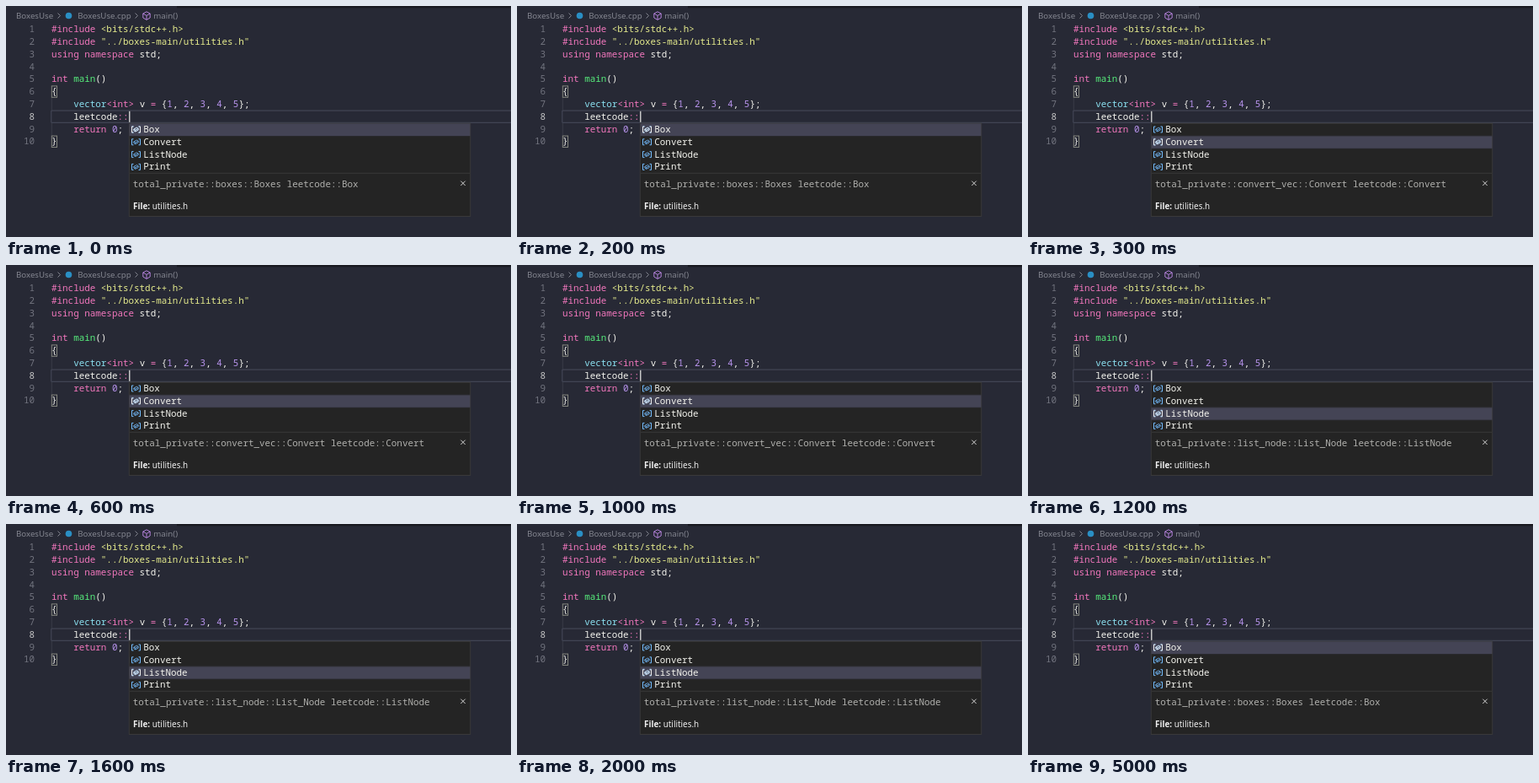
An HTML page for the animation above (5500 ms loop, 600 by 274 pixels).

```html
<!DOCTYPE html>
<html lang="en">
<head>
<meta charset="utf-8">
<title>Code completion</title>
<style>
html, body { margin: 0; width: 100%; height: 100%; overflow: hidden; background: #272935; }
svg { display: block; width: 600px; height: 274px; }
text { white-space: pre; }
.code { font: 10.9px "Noto Sans Mono", "DejaVu Sans Mono", monospace; fill: #f4f4ee; }
.ui { font: 9.7px "Noto Sans", "Open Sans", sans-serif; fill: #858791; }
.file { font-size: 9.9px; fill: #f0f0f0; }
.file tspan { font-weight: 700; }
.num { fill: #72747f; text-anchor: end; }
.num .now { fill: #c8c8c8; }
.k { fill: #f277bd; }
.s { fill: #e6ec8d; }
.t { fill: #8be0f0; }
.f { fill: #57ee7c; }
.n { fill: #b994ee; }
.line { fill: none; stroke-width: 1; }
.detail { fill: #b0b0ad; }
#items { color: #75beff; }
.mark { color: #f0f0f0; }

/* The selection rests on Box, Convert, ListNode, then returns to Box. */
.pick, .detail { animation: 5.5s step-end infinite; }
.pick { animation-name: pick; }
.box { animation-name: box; }
.convert { animation-name: convert; }
.list { animation-name: list; }
@keyframes pick {
  0%, 90.909% { transform: translateY(0); }
  5.4545% { transform: translateY(14.8px); }
  21.818% { transform: translateY(29.6px); }
}
@keyframes box {
  0%, 90.909% { visibility: visible; }
  5.4545% { visibility: hidden; }
}
@keyframes convert {
  0%, 21.818% { visibility: hidden; }
  5.4545% { visibility: visible; }
}
@keyframes list {
  0%, 90.909% { visibility: hidden; }
  21.818% { visibility: visible; }
}
</style>
</head>
<body>
<svg viewBox="0 0 600 274">
  <defs>
    <g id="symbol" class="line" stroke="currentColor">
      <path d="M-3 -3.5H-5V3.5H-3M3 -3.5H5V3.5H3"/>
      <path d="M-2.7 -.4L.8 -2.3L2.7 -1.1V.7L-.8 2.4L-2.7 1.3ZM-2.7 -.4L-.8 .7L2.7 -1.1M-.8 .7V2.4" stroke-width=".8"/>
    </g>
    <path id="chevron" class="line" stroke="#858791" d="M-1.5 -3L1.5 0L-1.5 3"/>
  </defs>

  <!-- Tab strip edge and breadcrumbs -->
  <rect x="203" width="397" height="2.4" fill="#191a21"/>
  <g class="ui">
    <text x="12" y="14.7">BoxesUse</text>
    <text x="85.3" y="14.7">BoxesUse.cpp</text>
    <text x="175.3" y="14.7">main()</text>
  </g>
  <use href="#chevron" x="63" y="11.5"/>
  <use href="#chevron" x="155" y="11.5"/>
  <circle cx="74.5" cy="11.5" r="3.8" fill="#2a8fc4"/>
  <path class="line" stroke="#b180d7" d="M167 6.8L171.2 9V14L167 16.4L162.8 14V9ZM162.8 9L167 11.4L171.2 9M167 11.4V16.4"/>

  <!-- Editor -->
  <path class="line" stroke="#484b5c" d="M600 124.1H53.8V138.3H600"/>
  <path class="line" stroke="#3b3d49" d="M54.3 109V124M54.3 139V154"/>
  <g class="line" stroke="#85877f">
    <rect x="54.3" y="94.9" width="6.2" height="13.4"/>
    <rect x="54.3" y="154.1" width="6.2" height="13.4"/>
  </g>
  <g class="code num" id="numbers"></g>
  <g class="code">
    <text x="54" y="31.2"><tspan class="k">#include</tspan> <tspan class="s">&lt;bits/stdc++.h&gt;</tspan></text>
    <text x="54" y="46"><tspan class="k">#include</tspan> <tspan class="s">"../boxes-main/utilities.h"</tspan></text>
    <text x="54" y="60.8"><tspan class="k">using namespace</tspan> std;</text>
    <text x="54" y="90.4"><tspan class="k">int</tspan> <tspan class="f">main</tspan>()</text>
    <text x="54" y="105.2">{</text>
    <text x="80.2" y="120"><tspan class="t">vector</tspan><tspan class="k">&lt;int&gt;</tspan> v <tspan class="k">=</tspan> {<tspan class="n">1</tspan>, <tspan class="n">2</tspan>, <tspan class="n">3</tspan>, <tspan class="n">4</tspan>, <tspan class="n">5</tspan>};</text>
    <text x="80.2" y="134.8">leetcode<tspan class="k">::</tspan></text>
    <text x="80.2" y="149.6"><tspan class="k">return</tspan> <tspan class="n">0</tspan>;</text>
    <text x="54" y="164.4">}</text>
  </g>
  <rect x="146.2" y="124.8" width="1.2" height="13" fill="#eeeeea"/>

  <!-- Suggestions -->
  <rect x="146.3" y="139.2" width="405.4" height="110.3" fill="#242424" stroke="#393939"/>
  <rect class="pick" x="146.5" y="139.4" width="405" height="14.8" fill="#444455"/>
  <g class="code" id="items"></g>
  <g class="pick mark"><use href="#symbol" x="154.5" y="146.5"/></g>
  <path class="line" stroke="#393939" d="M147 198.3H551"/>
  <g class="code">
    <text class="detail box" x="150.7" y="214.7">total_private::boxes::Boxes leetcode::Box</text>
    <text class="detail convert" x="150.7" y="214.7">total_private::convert_vec::Convert leetcode::Convert</text>
    <text class="detail list" x="150.7" y="214.7">total_private::list_node::List_Node leetcode::ListNode</text>
  </g>
  <path class="line" stroke="#d0d0d0" d="M540.3 207.6L545.7 213M545.7 207.6L540.3 213"/>
  <text class="ui file" x="151" y="241.4"><tspan>File:</tspan> utilities.h</text>
</svg>
<script>
const pitch = 14.8;
const fill = (id, count, draw) => {
  document.getElementById(id).innerHTML = Array.from({ length: count }, (_, i) => draw(i)).join("");
};
const names = ["Box", "Convert", "ListNode", "Print"];

fill("numbers", 10, i =>
  `<text x="34" y="${31.2 + i * pitch}"${i === 7 ? ' class="now"' : ""}>${i + 1}</text>`);
fill("items", names.length, i =>
  `<use href="#symbol" x="154.5" y="${146.5 + i * pitch}"/>` +
  `<text x="163.3" y="${150 + i * pitch}">${names[i]}</text>`);
</script>
</body>
</html>
```
